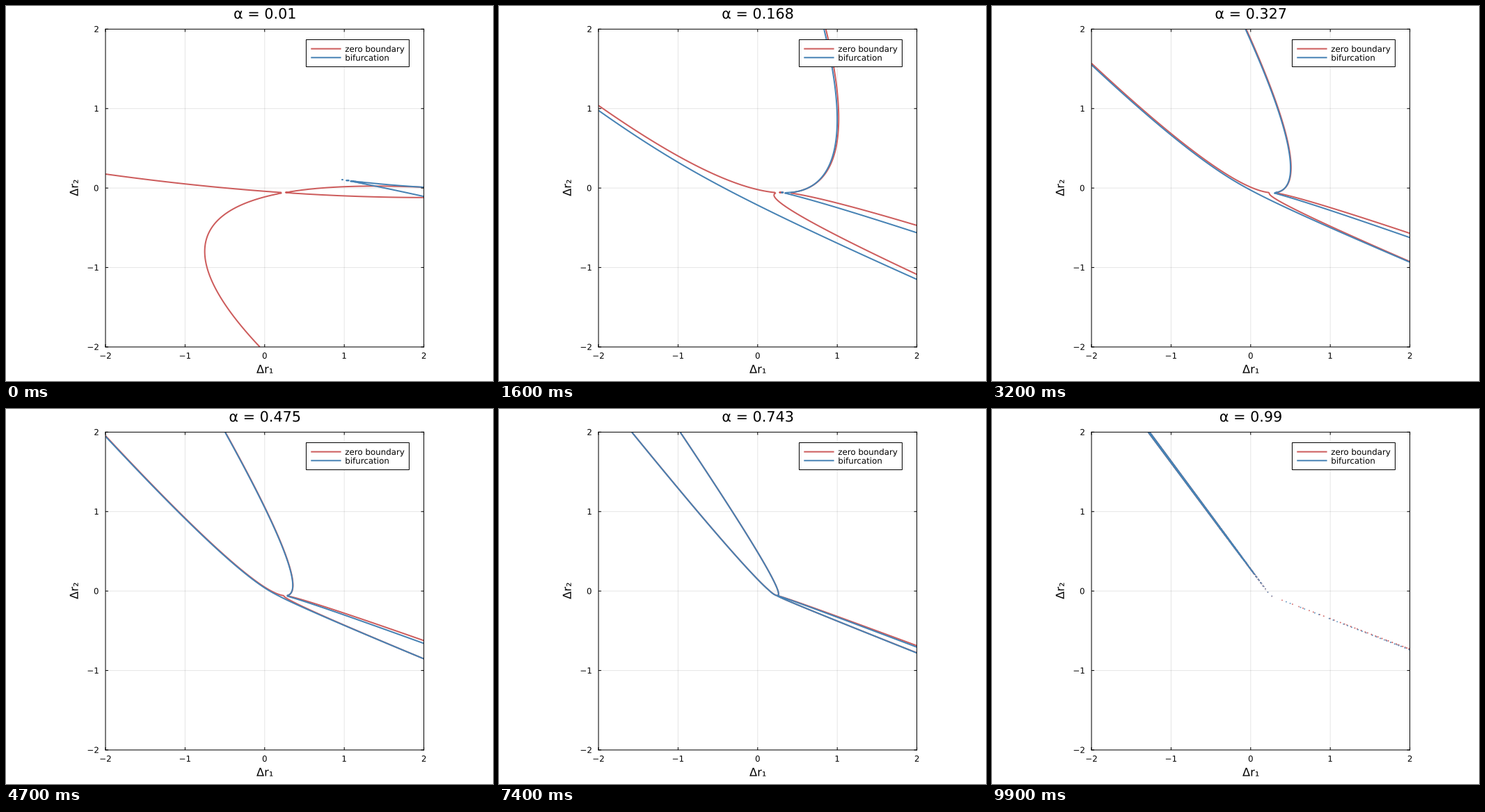
Write a matplotlib script that moves like this. It is 700 by 540 pixels and loops after 10 s.

```python
import numpy as np
import matplotlib.pyplot as plt
from matplotlib.animation import FuncAnimation
from matplotlib.lines import Line2D
from matplotlib.patches import PathPatch, Rectangle
from matplotlib.textpath import TextPath
from matplotlib.transforms import Affine2D

W, H = 700, 540
LEFT, RIGHT, TOP, BOTTOM = 143.0, 600.6, 33.3, 491.0
FRAMES, INTERVAL = 100, 100
RED, BLUE = "#cd5c5c", "#4682b4"
PT = 0.72  # points per pixel at 100 dpi
LINE = 2 * PT

# Two-species model: r = (1-a)(U s + P t) + a(V s^2 + Q t^2 + C s t)
ORIGIN = (0.247, -0.058)
U = np.array([1.0, 0.178])
P = np.array([1.0, -0.0672])
V = np.array([24.5, -9.41])
Q = np.array([-1.332, 1.797])
C = np.array([-0.88, 1.145])

axis = np.linspace(-2, 2, 400)
GX, GY = np.meshgrid(axis, axis)
RX, RY = GX - ORIGIN[0], GY - ORIGIN[1]

plt.rcParams["path.snap"] = False
fig = plt.figure(figsize=(W / 100, H / 100), dpi=100, facecolor="white")
px = Affine2D().scale(1 / W, -1 / H).translate(0, 1) + fig.transFigure


def text_path(x, y, text, size, ha="center", angle=0):
    """Outline of a text in pixel coordinates, y being the baseline."""
    path = TextPath((0, 0), text, size=size, prop={"family": "DejaVu Sans"})
    box = path.get_extents()
    shift = {"left": 0, "center": (box.x0 + box.x1) / 2, "right": box.x1}[ha]
    place = Affine2D().translate(-shift, 0).scale(1, -1)
    return place.rotate_deg(-angle).translate(x, y).transform_path(path)


def label(*args, **kw):
    return fig.add_artist(PathPatch(text_path(*args, **kw), facecolor="black",
                                    linewidth=0, transform=px, zorder=7))


def line(xs, ys, color="black", width=PT):
    fig.add_artist(Line2D(xs, ys, color=color, linewidth=width,
                          solid_capstyle="butt", transform=px, zorder=6))


def parabola(lin, quad):
    """Implicit form of the curve lin*t + quad*t^2."""
    det = lin[0] * quad[1] - lin[1] * quad[0]
    return ((RX * quad[1] - RY * quad[0]) ** 2
            + det * (RX * lin[1] - RY * lin[0]))


def zero_boundary(a):
    return parabola((1 - a) * U, a * V) * parabola((1 - a) * P, a * Q)


def bifurcation(a):
    """Discriminant of the pencil of the two conics: zero where they touch."""
    mul = np.polymul
    v, q, c = a * V, a * Q, a * C / 2
    u, p = (1 - a) * U / 2, (1 - a) * P / 2
    e2, e1, e0 = mul(v, q) - mul(c, c)
    k = 2 * mul(mul(c, u), p) - mul(mul(q, u), u) - mul(mul(v, p), p)
    d3 = k[0] - RX * e2
    d2 = k[1] - RX * e1 - RY * e2
    d1 = k[2] - RX * e0 - RY * e1
    d0 = k[3] - RY * e0
    return (18 * d3 * d2 * d1 * d0 - 4 * d2 ** 3 * d0 + (d2 * d1) ** 2
            - 4 * d3 * d1 ** 3 - 27 * (d3 * d0) ** 2)


# Axes, grid and ticks
ax = fig.add_axes([LEFT / W, 1 - BOTTOM / H,
                   (RIGHT - LEFT) / W, (BOTTOM - TOP) / H])
ticks = range(-2, 3)
ax.set(xlim=(-2, 2), ylim=(-2, 2), xticks=ticks, yticks=ticks)
ax.set_axisbelow(True)
ax.grid(color="black", alpha=0.1, linewidth=PT)
ax.tick_params(length=0, labelbottom=False, labelleft=False)
for spine in ax.spines.values():
    spine.set_linewidth(PT)

for n in ticks:
    text = str(n).replace("-", "\u2212")
    x = LEFT + (n + 2) / 4 * (RIGHT - LEFT)
    y = BOTTOM - (n + 2) / 4 * (BOTTOM - TOP)
    for edge, inward in ((BOTTOM, -4), (TOP, 4)):
        line([x, x], [edge, edge + inward])
    for edge, inward in ((LEFT, 4), (RIGHT, -4)):
        line([edge, edge + inward], [y, y])
    label(x, 507.8, text, 11.85)
    label(132.7, y + 4.3, text, 11.85, ha="right")

label(371.8, 528.6, "Δr₁", 16.3)
label(103.6, 262.1, "Δr₂", 16.3, angle=90)
title = label(371.9, 18.2, "α", 20.75)

# Legend
fig.add_artist(Rectangle((431.5, 48.5), 148, 39, facecolor="white",
                         edgecolor="black", linewidth=PT, transform=px,
                         zorder=5))
for y, color, name in ((61.6, RED, "zero boundary"),
                       (74.3, BLUE, "bifurcation")):
    line([438.3, 481.6], [y, y], color, LINE)
    label(487.3, y + 4.4, name, 11.85, ha="left")

curves = []


def draw(i):
    while curves:
        curves.pop().remove()
    a = 0.01 + 0.98 * i / (FRAMES - 1)
    title.set_path(text_path(371.9, 18.2, f"α = {round(a, 3)}", 20.75))
    for func, color in ((zero_boundary, RED), (bifurcation, BLUE)):
        curves.append(ax.contour(GX, GY, func(a), levels=[0], colors=color,
                                 linewidths=LINE, linestyles="solid"))
    return [title]


anim = FuncAnimation(fig, draw, frames=FRAMES, interval=INTERVAL,
                     init_func=lambda: draw(0), repeat=True, repeat_delay=0,
                     blit=False)
plt.show()
```
